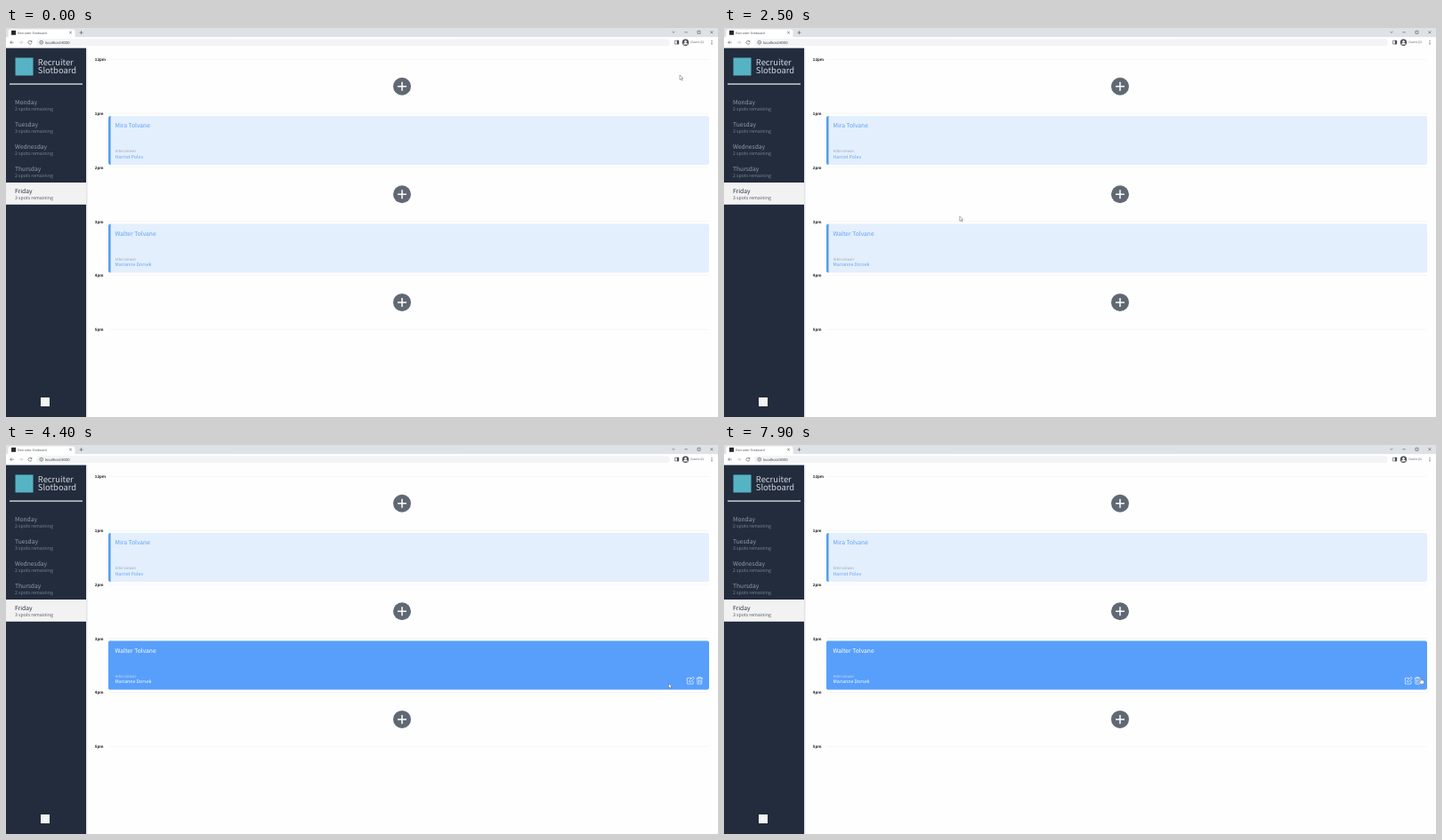
These frames come from a looping animation (800 px wide and 438 px high, 8 s). An HTML page:

```html
<!DOCTYPE html>
<html lang="en">
<head>
<meta charset="utf-8">
<title>Recruiter Slotboard</title>
<style>
  html, body { margin: 0; width: 100%; height: 100%; overflow: hidden; background: #fefefe; }
  svg { display: block; width: 100vw; height: 100vh; }
  text { font-family: "Noto Sans CJK JP", "Noto Sans CJK SC", "Noto Sans", sans-serif; text-rendering: geometricPrecision; }
  .ui { font-family: "Open Sans", sans-serif; }
  .line { fill: none; stroke: #4a4d51; stroke-width: .6; }
  .regular { font-size: 6.71px; }
  .light { font-size: 5.2px; font-weight: 300; }
  .hour { font-size: 4.4px; font-weight: 700; fill: #1c1c1e; }
  .logo { font-size: 9.4px; font-weight: 300; fill: #d3d7dc; }

  .card .body { fill: #e3effc; }
  .card .edge { fill: #589fe9; }
  .card .name { fill: #5fa1f8; }
  .card .label { font-size: 4.45px; font-weight: 300; fill: #98a5b8; }
  .card .person { font-size: 5.22px; fill: #5fa1f8; }
  .card .icons { display: none; fill: none; stroke: #e6f0ff; stroke-width: .75; }
  .card.hover .body, .card.hover .edge { fill: #589ffb; }
  .card.hover .name, .card.hover .person { fill: #fff; }
  .card.hover .label { fill: #c5defe; }
  .card.hover .icons { display: inline; }

  .question { font-size: 8.65px; font-weight: 700; fill: #dc4459; }
  .button rect { fill: none; stroke: #dc4459; stroke-width: .9; }
  .button text { fill: #dc4459; }
  .button.hover rect { fill: #db3c53; }
  .button.hover text { fill: #fbe9ec; }
</style>
</head>
<body>
<svg id="stage" viewBox="0 0 800 438" preserveAspectRatio="none"></svg>
<script>
const LOOP = 8000, STEP = 100;
const ROW = 60.8, FIRST_ROW = 35.4;
const CONFIRM_FROM = 5600, CONFIRM_TO = 6900;

// Pointer path: time, x, y
const path = [
  [1300, 757, 53], [1500, 585, 67], [1600, 388, 98.7], [1800, 300, 128],
  [2000, 272, 148], [2200, 262, 182], [2500, 264.8, 212], [2600, 312, 240],
  [2700, 390, 284], [2800, 449, 317], [3100, 450, 324], [3400, 450, 319],
  [3600, 450, 319], [3800, 480, 300], [4000, 570, 264], [4200, 690, 262],
  [4400, 744.5, 268.5], [4500, 746, 268.5], [4700, 762, 266], [5000, 781, 264],
  [5900, 781, 264], [6100, 740, 259], [6300, 600, 254], [6500, 470, 259],
  [6700, 433, 263], [6800, 433, 263], [7000, 450, 262], [7200, 560, 256],
  [7400, 690, 258], [7600, 770, 262], [7700, 781, 262], [7900, 783, 262]
];

const text = (x, y, cls, str, attrs = '') => `<text x="${x}" y="${y}" class="${cls}" ${attrs}>${str}</text>`;
const rect = (x, y, w, h, fill, r = 0) => `<rect x="${x}" y="${y}" width="${w}" height="${h}" fill="${fill}" rx="${r}"/>`;
const line = (d, attrs = '') => `<path class="line" d="${d}" ${attrs}/>`;

const browserBar = () =>
  rect(0, 0, 800, 10.5, '#dee1e6') + rect(2.5, 1.5, 75, 12, '#fff', 2.5) + rect(0, 10.3, 800, 12.3, '#fff') +
  rect(34, 12.3, 712, 8, '#f3f4f5', 4) + rect(6, 2.8, 5, 5, '#25272c') +
  text(13.3, 6.6, 'ui', 'Recruiter Slotboard', 'font-size="3.6" fill="#44474b"') +
  text(44, 17.8, 'ui', 'localhost:8000', 'font-size="4.1" fill="#303236"') +
  text(769.3, 17.4, 'ui', 'Guest (2)', 'font-size="3.5" fill="#55585c"') +
  line('M71.2 3.8l2.6 2.6m0-2.6l-2.6 2.6M84.5 3.2v4m-2-2h4') +
  line('M8.7 16.2h-4m1.8-1.8l-1.8 1.8 1.8 1.8') +
  line('M14.7 16.2h4m-1.8-1.8l1.8 1.8-1.8 1.8', 'style="stroke:#b5b8bc"') +
  line('M28.6 15.1a2 2 0 1 0 .3 1.6M28.9 14v1.5h-1.5') +
  line('M41.6 16.2a1.9 1.9 0 1 0-3.8 0a1.9 1.9 0 1 0 3.8 0M39.7 16v1.1M39.7 15v.4') +
  line('M748.5 4l1.5 1.4L751.5 4M762.5 4.8h3.2M777 3.3h3v3h-3zM791.4 3.3l3 3m0-3l-3 3') +
  line('M751.6 14.2h4.2v3.8h-4.2z') + rect(753.8, 14, 2.2, 4.2, '#4a4d51') +
  '<circle cx="763.5" cy="16.2" r="3.7" fill="#4f5358"/><circle cx="763.5" cy="15.2" r="1.2" fill="#fff"/>' +
  '<path d="M761.1 18.4a2.4 1.8 0 0 1 4.8 0z" fill="#fff"/>' +
  [14.5, 16.2, 17.9].map(y => `<circle cx="793" cy="${y}" r=".55" fill="#4a4d51"/>`).join('');

const dayItem = ([day, spots], i) => {
  const y = 74 + 25 * i, active = day === 'Friday';
  return (active ? rect(0, y, 90, 24.8, '#f2f2f2') : '') +
    text(10, y + 11.6, 'regular', day, `fill="${active ? '#28313f' : '#939ba6'}"`) +
    text(10, y + 18.7, 'light', `${spots} spots remaining`, `fill="${active ? '#535b66' : '#7d8692'}"`);
};

const sidebar = () =>
  rect(90, 22.6, 1.5, 416, '#e2e4e8') + rect(0, 22.6, 90, 416, '#222c3d') +
  rect(10.5, 33.5, 20, 20, '#56b3c4') + rect(39, 416, 10, 10, '#f4f4f4') +
  text(35.8, 42.3, 'logo', 'Recruiter') + text(35.8, 51.3, 'logo', 'Slotboard') +
  rect(4, 62.5, 82, 1.2, '#f4f5f6') +
  [['Monday', 2], ['Tuesday', 3], ['Wednesday', 2], ['Thursday', 2], ['Friday', 3]].map(dayItem).join('');

const hourRow = (hour, i) => {
  const y = FIRST_ROW + ROW * i;
  return text(99.8, y + 1.7, 'hour', hour) + rect(115, y - .4, 675, .8, '#f4f4f5');
};

const plusButton = y => `<circle cx="445" cy="${y}" r="10" fill="#606973"/>
  <path d="M445 ${y - 5}v10m-5-5h10" stroke="#fff" stroke-width="1.5"/>`;

const card = (id, y, name, person) => `<g id="${id}" class="card" transform="translate(0 ${y})">
  <rect class="body" x="115" width="675" height="55" rx="2.5"/>
  <path class="edge" d="M117.6 0v55h-.1a2.5 2.5 0 0 1-2.5-2.5v-50a2.5 2.5 0 0 1 2.5-2.5z"/>
  ${text(122.5, 13, 'name regular', name)}${text(122.5, 41.5, 'label', 'Interviewer')}${text(122.5, 47.8, 'person', person)}
  <g class="icons">
    <path d="M770 41.8h-4.6v6.6h6.6v-3.4M767.6 46.3l.4-1.8 4-4 1.4 1.4-4 4z"/>
    <path d="M775.8 42h7M777.9 42v-1.2h2.8v1.2M776.6 42l.4 6.5h4.6l.4-6.5M778.4 43.5v3.6M780.2 43.5v3.6"/>
  </g></g>`;

const button = (id, x, label) => `<g id="${id}" class="button"><rect x="${x + .4}" y="259.4" width="39.2" height="9.4" rx="4.7"/>
  ${text(x + 20, 266.5, 'regular', label, 'text-anchor="middle"')}</g>`;

const confirmBox = () => `<g id="confirmBox">
  <rect x="115.4" y="220.9" width="674.2" height="54.4" rx="2.5" fill="#f8dee2" stroke="#d44a5d" stroke-width="1"/>
  ${text(452.5, 236.4, 'question', 'Are you sure you would like to delete?', 'text-anchor="middle"')}
  ${button('cancel', 410, 'Cancel')}${button('confirm', 455, 'Confirm')}</g>`;

const pointer = `<g id="pointer" fill="#fff" stroke="#4a4d52" stroke-width=".45" stroke-linejoin="round">
  <path id="arrow" d="M0 0v5.3l1.3-1.1.9 2 .9-.4-.9-2h1.7z"/>
  <path id="hand" d="M-.6.4q.6-.8 1.2 0v2.4l2.3.5q.9.3.8 1.2l-.5 2.7h-3.4l-1.9-2.5q-.4-.9.4-.9l1.1.7z"/></g>`;

const plusRows = [65.7, 187.3, 308.9];
const cardTops = { first: 98.9, second: 220.6 };

const $ = id => document.getElementById(id);
$('stage').innerHTML = browserBar() + sidebar() +
  ['12pm', '1pm', '2pm', '3pm', '4pm', '5pm'].map(hourRow).join('') + plusRows.map(plusButton).join('') +
  card('first', cardTops.first, 'Mira Tolvane', 'Harriet Polev') +
  card('second', cardTops.second, 'Walter Tolvane', 'Marianne Dorsek') + confirmBox() + pointer;

function pointerAt(t) {
  const next = path.findIndex(p => p[0] > t);
  if (next === 0) return path[0].slice(1);
  if (next < 0) return path[path.length - 1].slice(1);
  const [t0, x0, y0] = path[next - 1], [t1, x1, y1] = path[next];
  const k = (t - t0) / (t1 - t0);
  return [x0 + (x1 - x0) * k, y0 + (y1 - y0) * k];
}

const show = (id, on) => $(id).style.display = on ? 'inline' : 'none';

function draw(t) {
  const [x, y] = pointerAt(t);
  const inside = (left, top, w, h) => x >= left && x <= left + w && y >= top && y <= top + h;
  const asking = t >= CONFIRM_FROM && t < CONFIRM_TO;

  for (const id in cardTops) $(id).classList.toggle('hover', inside(115, cardTops[id], 675, 55));
  const onCancel = asking && inside(410, 259, 40, 10);
  $('cancel').classList.toggle('hover', onCancel);
  show('second', !asking);
  show('confirmBox', asking);

  const onPlus = plusRows.some(cy => Math.hypot(x - 445, y - cy) < 10);
  const onIcon = !asking && inside(764, 260, 20, 9);
  const clickable = onPlus || onIcon || onCancel;
  show('hand', clickable);
  show('arrow', !clickable);
  $('pointer').setAttribute('transform', `translate(${x} ${y})`);
}

const start = performance.now();
function tick() {
  const elapsed = performance.now() - start;
  draw(Math.floor(elapsed % LOOP / STEP) * STEP);
  requestAnimationFrame(tick);
}
tick();
</script>
</body>
</html>
```
